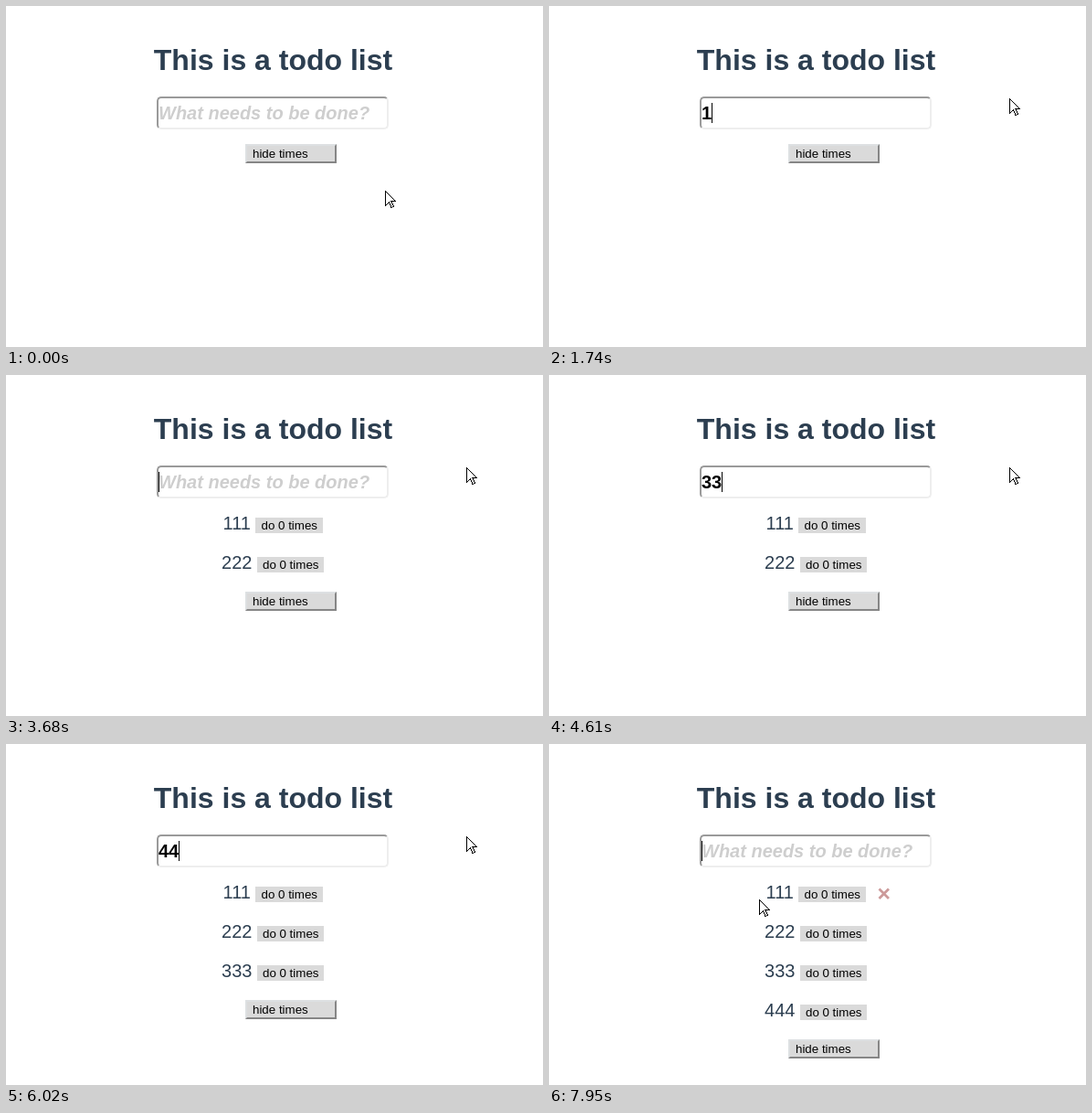
An HTML page that plays this animation: 588 by 373 pixels, repeating every 8000 ms.

```html
<!DOCTYPE html>
<html lang="en">
<head>
<meta charset="utf-8">
<title>Todo list</title>
<style>
  html, body { margin: 0; width: 100%; height: 100%; overflow: hidden; background: #fff; }
  body { position: relative; font: 20px/22px "Liberation Sans", Arial, sans-serif; color: #2c3e50; }
  body > * { position: absolute; margin: 0; box-sizing: border-box; white-space: pre; }
  h1 { left: 0; top: 41px; width: 585px; font-size: 32px; line-height: 36px; text-align: center; }
  #field { left: 165px; top: 99px; width: 254px; height: 36px; border: 2px solid;
    border-color: #9a9a9a #eee #eee #9a9a9a; border-radius: 5px; }
  #hint, #typed { left: 167px; top: 106px; font-weight: bold; }
  #hint { font-style: italic; color: #cecece; }
  #typed { color: #000; }
  #caret { left: 167px; top: 106px; width: 1px; height: 22px; background: #000; }
  .row { left: 165px; width: 254.5px; text-align: center; }
  .row span, #hide { font-size: 13.333px; line-height: 15px; color: #000; background: #dadada; }
  .row span { display: inline-block; padding: 1px 6px; }
  #hide { left: 262px; width: 100px; height: 21px; padding: 1px 6px; border: 2px solid;
    border-color: #dde0e2 #868686 #868686 #dde0e2; }
  svg { left: 0; top: 0; overflow: visible; }
  #remove { stroke: #cc9a9a; stroke-width: 2.8; }
  #pointer { stroke: #000; shape-rendering: crispEdges; }
</style>
</head>
<body>
<h1>This is a todo list</h1>
<div id="field"></div>
<div id="hint">What needs to be done?</div>
<div id="typed"></div>
<div id="caret"></div>
<div id="hide">hide times</div>
<svg width="588" height="373" fill="none">
  <path id="remove" d="M361.5 158.5l10.5 10.5M372 158.5l-10.5 10.5"/>
  <g id="pointer">
    <path id="arrow" fill="#fff" d="M.5 .5V16.5L4.5 12.5 7 18.5 9.5 17.5 7 11.5H11.5Z"/>
    <path id="beam" d="M-3 -8.5h3M1 -8.5h3M.5 -8V8M-3 8.5h3M1 8.5h3"/>
  </g>
</svg>
<script>
const LOOP = 8000, BLINK = 530, MOUSE_STEP = 77, ROW_TOP = 151, ROW_GAP = 43;
const CLICK = 680;
const $ = id => document.getElementById(id);

// Each entry is typed as three evenly spaced digits, then Enter
const entries = [
  { from: 1740, enter: 2600 },
  { from: 2980, enter: 3680 },
  { from: 4140, enter: 5160 },
  { from: 5560, enter: 6490 }
];
const keyTimes = ({ from, enter }) => [0, 1, 2, 3].map(n => from + n * (enter - from) / 4);
const activity = [CLICK, ...entries.flatMap(e => [...keyTimes(e).slice(0, 3), e.enter])];

// Pointer moves along quadratic curves, sampled at the mouse rate
const moves = [
  { at: 70, steps: 4, path: [[415, 202], [375, 140], [311, 109]] },
  { at: 440, steps: 10, path: [[311, 109], [320, 140], [504, 101]] },
  { at: 7250, steps: 10, path: [[504, 101], [400, 75], [230, 170]] }
];

const rows = entries.map((_, i) => {
  const row = document.createElement("div");
  row.className = "row";
  row.style.top = ROW_TOP + ROW_GAP * i + "px";
  row.innerHTML = `${String(i + 1).repeat(3)} <span>do 0 times</span>`;
  document.body.insertBefore(row, $("hide"));
  return row;
});

const show = (el, on) => { el.style.visibility = on ? "visible" : "hidden"; };
const ease = p => p * p * (3 - 2 * p);

function typedAt(t) {
  const i = entries.findIndex(e => t >= e.from && t < e.enter);
  if (i < 0) return "";
  const count = keyTimes(entries[i]).filter(key => t >= key).length;
  return String(i + 1).repeat(Math.min(count, 3));
}

function caretAt(t) {
  const last = activity.filter(time => t >= time).pop();
  return last !== undefined && (t - last) % (2 * BLINK) < BLINK;
}

function pointerAt(t) {
  const { at, steps, path: [a, b, c] } = moves.filter(m => t >= m.at).pop() || moves[0];
  const step = t < at ? 0 : Math.floor((t - at) / MOUSE_STEP) + 1;
  const s = ease(Math.min(step / steps, 1)), r = 1 - s;
  return [0, 1].map(k => Math.round(r * r * a[k] + 2 * r * s * b[k] + s * s * c[k]));
}

function render(t) {
  const text = typedAt(t);
  const done = entries.filter(e => t >= e.enter).length;
  $("typed").textContent = text;
  show($("hint"), !text);
  rows.forEach((row, i) => show(row, i < done));
  $("hide").style.top = ROW_TOP + ROW_GAP * done + "px";

  $("caret").style.left = 167 + Math.floor($("typed").getBoundingClientRect().width) + "px";
  show($("caret"), caretAt(t));

  const [x, y] = pointerAt(t);
  const overField = x >= 165 && x < 419 && y >= 99 && y < 135;
  $("pointer").setAttribute("transform", `translate(${x} ${y})`);
  show($("arrow"), !overField);
  show($("beam"), overField);
  show($("remove"), done > 0 && x < 419 && y > 145 && y < 180);
}

const start = performance.now();
function tick() {
  render((performance.now() - start) % LOOP);
  requestAnimationFrame(tick);
}
tick();
</script>
</body>
</html>
```
